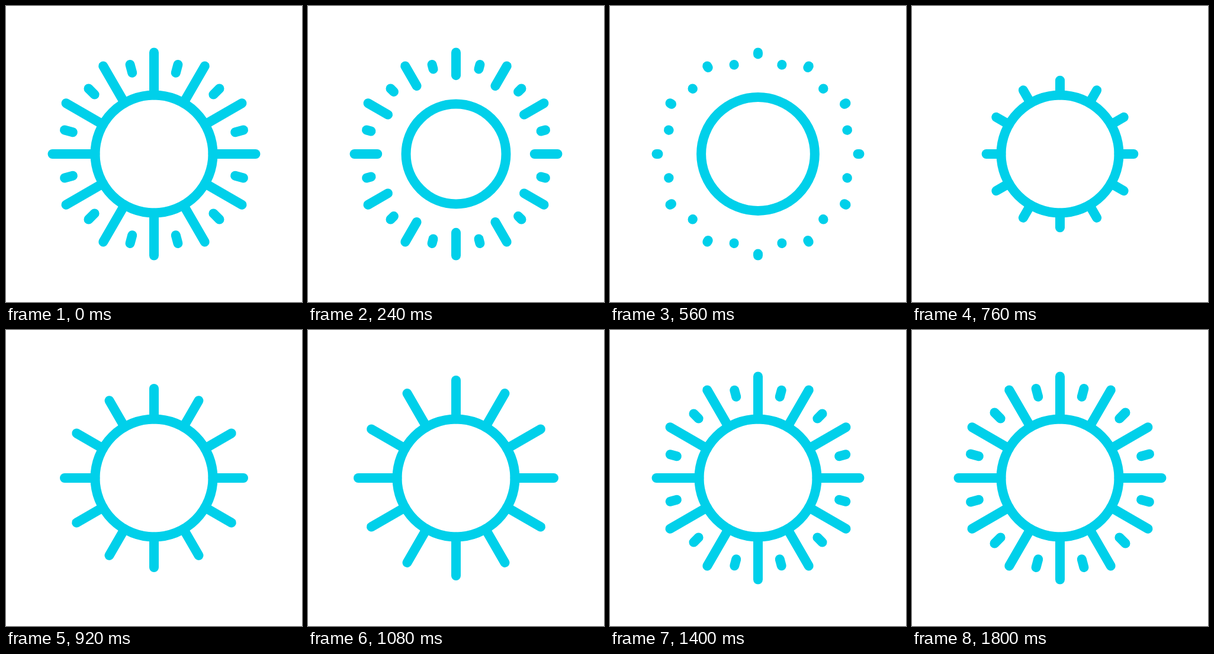
An HTML page with a canvas for the animation above (2400 ms loop, 500 px wide and 500 px high).

```html
<!DOCTYPE html>
<html>
<head>
<meta charset="utf-8">
<title>Sun</title>
<style>
html, body { margin: 0; width: 100%; height: 100%; overflow: hidden; background: #fff; }
canvas { display: block; }
</style>
</head>
<body>
<canvas id="stage" width="500" height="500"></canvas>
<script>
const ctx = document.getElementById('stage').getContext('2d');
const LOOP = 2400, STEP = 40;
const RING = 99.5, RING_SMALL = 81.7;
const LONG = [RING, 171.5], SHORT = [142, 156.3];
const SHRINK_END = 660;

const progress = (t, start, length) => Math.min(1, Math.max(0, (t - start) / length));
const mix = (a, b, k) => a + (b - a) * k;
const easeOut = u => 1 - (1 - u) ** 3;
const easeInOut = u => u < 0.5 ? 2 * u * u : 1 - 2 * (1 - u) ** 2;
const easeShrink = u => 1.1 * u + 0.8 * u * u - 0.9 * u ** 3;

// Twelve round-capped rays between two radii
function rays(inner, outer, offset) {
  for (let i = 0; i < 12; i++) {
    const a = (i * 30 + offset) * Math.PI / 180, x = Math.cos(a), y = Math.sin(a);
    ctx.beginPath();
    ctx.moveTo(x * inner, y * inner);
    ctx.lineTo(x * Math.max(outer, inner + 0.01), y * Math.max(outer, inner + 0.01));
    ctx.stroke();
  }
}

// Rays first retract towards their tips, then grow again from their bases
function rayGroup(t, [base, tip], offset, growStart, growTime) {
  if (t < SHRINK_END) {
    rays(mix(base, tip, easeShrink(t / SHRINK_END)), tip, offset);
  } else if (t >= growStart) {
    rays(base, mix(base, tip, easeOut(progress(t, growStart, growTime))), offset);
  }
}

function draw(t) {
  ctx.setTransform(1, 0, 0, 1, 0, 0);
  ctx.fillStyle = '#fff';
  ctx.fillRect(0, 0, 500, 500);
  ctx.translate(250, 250);
  ctx.strokeStyle = '#00d0ea';
  ctx.lineWidth = 16;
  ctx.lineCap = 'round';

  const dip = easeInOut(progress(t, 0, 333)) - easeInOut(progress(t, 333, 333));
  ctx.beginPath();
  ctx.arc(0, 0, mix(RING, RING_SMALL, dip), 0, 2 * Math.PI);
  ctx.stroke();

  rayGroup(t, LONG, 0, SHRINK_END, 760);
  rayGroup(t, SHORT, 15, 1110, 690);
}

const begin = performance.now();
function frame() {
  const t = (performance.now() - begin) % LOOP;
  draw(Math.floor(t / STEP) * STEP);
  requestAnimationFrame(frame);
}
frame();
</script>
</body>
</html>
```
